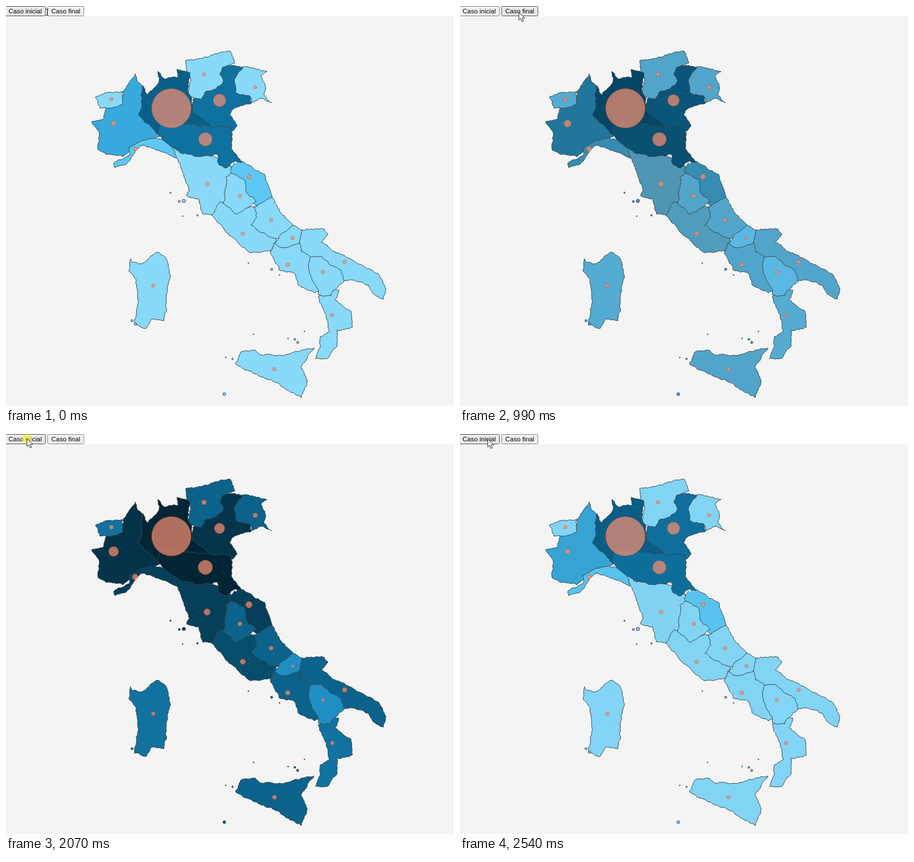
Write an HTML page that moves like this. It is 791 px wide and 708 px high and loops after 2610 ms.

```html
<!DOCTYPE html>
<html lang="es">
<head>
<meta charset="utf-8">
<title>Mapa</title>
<style>
html, body { margin: 0; width: 100%; height: 100%; overflow: hidden; background: #fff; }
svg { display: block; width: 791px; height: 708px; }
text { font: 11.5px "Liberation Sans", Arial, sans-serif; fill: #000; }
#land { stroke: #37474f; stroke-width: 1; stroke-linejoin: round; }
#dots { fill: #fa9172; fill-opacity: .7; stroke: #c9623f; stroke-opacity: .8; }
</style>
</head>
<body>
<svg viewBox="0 0 791 708">
  <rect y="18" width="791" height="690" fill="#f4f4f4"/>
  <g id="land"></g>
  <circle cx="405.5" cy="277" r="2" fill="#f4f4f4"/>
  <g id="dots"></g>
  <rect id="first" x="-2.5" y=".5" width="72" height="17" rx="2"/>
  <rect id="second" x="73.5" y=".5" width="64" height="17" rx="2"/>
  <text x="4.5" y="13">Caso inicial</text>
  <text x="80" y="13">Caso final</text>
  <circle id="click" r="9" fill="#f5ee3c" fill-opacity=".7"/>
  <path id="beam" d="M70,5.5h5M72.5,6v10M70,16.5h5" stroke="#333" fill="none"/>
  <path id="arrow" d="M0,0V14.2L3.2,11.2L5.6,16.6L8,15.6L5.7,10.3H10.2Z" fill="#fff" stroke="#111" stroke-width=".9"/>
</svg>
<script>
const LOOP = 2610, STEP = 76.8, LAST = 33, FADE = 6.7;
const $ = id => document.getElementById(id);
const lerp = (a, b, u) => a + (b - a) * u;
const span = (k, a, b) => Math.min(1, Math.max(0, (k - a) / (b - a)));
const ease = u => u < .5 ? 4 * u ** 3 : 1 - 4 * (1 - u) ** 3;
const rgb = hex => [1, 3, 5].map(i => parseInt(hex.slice(i, i + 2), 16));
const mix = (a, b, u) => `rgb(${a.map((v, i) => Math.round(lerp(v, b[i], u)))})`;
const parse = text => text.trim().split(/\s+/).map(p => p.split(",").map(Number));

function add(parent, tag, attrs) {
  const node = document.createElementNS("http://www.w3.org/2000/svg", tag);
  for (const key in attrs) node.setAttribute(key, attrs[key]);
  return $(parent).appendChild(node);
}

// Splits an edge into jagged pieces; the same edge always breaks the same way.
function roughen([ax, ay], [bx, by]) {
  const dx = bx - ax, dy = by - ay, len = Math.hypot(dx, dy);
  if (len < 4) return [[bx, by]];
  const noise = Math.sin((ax + bx) * 12.9 + (ay + by) * 78.2) * 43758.5;
  const side = (dx || dy) < 0 ? -1 : 1;
  const off = side * (noise - Math.floor(noise) - .5) * Math.min(.34, 2.8 / len);
  const mid = [(ax + bx) / 2 - dy * off, (ay + by) / 2 + dx * off];
  return [...roughen([ax, ay], mid), ...roughen(mid, [bx, by])];
}

function outline(pts) {
  const all = pts.flatMap((p, i) => roughen(p, pts[(i + 1) % pts.length]));
  return "M" + all.map(p => p.map(v => v.toFixed(1))).join("L") + "Z";
}

const LIGHT = "#88d9fa", SKY = "#5dc8f5", BLUE = "#0f719f";
const DEEP = "#0b628b", NAVY = "#053f5a", NIGHT = "#022535", MID = "#1172a0", PALE = "#1e8ec3";
const regions = [];

// Corners only; later regions cover the loose edges of earlier ones. Islets are x,y,radius.
function region([from, to], [cx, cy], [r0, r1], corners, islets) {
  const shapes = [add("land", "path", { d: outline(parse(corners)) })];
  if (islets) for (const [x, y, r = .9] of parse(islets)) {
    shapes.push(add("land", "circle", { cx: x, cy: y, r }));
  }
  regions.push({ from: rgb(from), to: rgb(to), r0, r1, shapes, dot: add("dots", "circle", { cx, cy }) });
}

// Piemonte
region(["#37a9dc", "#043349"], [190, 208], [4.3, 8.5],
  `228,120 231,131 243,142 248,165 246,200 272,230 255,241 222,250 206,267 177,263 163,255
   165,227 151,205 173,199 176,180 203,170 207,151 220,132`);
// Valle d'Aosta
region([LIGHT, MID], [186, 165], [2.8, 3.5], "158,161 181,153 206,151 206,174 183,181 166,181");
// Toscana
region([LIGHT, NAVY], [355, 315], [3.1, 5.5],
  `284,246 330,258 376,270 398,284 402,305 394,350 366,371 347,368 340,341 319,336 324,327
   314,300 301,269`,
  "290.5,330.5,1.3 306,346,1.8 314,345,3 312,372 338,370.5,1.4");
// Liguria
region([SKY, NAVY], [228, 253], [3.5, 5],
  `190,279 217,265 217,250 231,243 262,233 292,243 301,269 272,257 244,246 228,256 212,280 192,286`);
// Veneto
region([BLUE, "#04344a"], [377, 167], [11, 9],
  `376,126 380,112 390,105 418,108 412,125 412,148 431,160 434,171 399,184 395,193 408,213
   399,222 345,210 326,188 330,165 352,150`);
// Trentino-Alto Adige
region([LIGHT, DEEP], [349.5, 121], [2.8, 4],
  `317,97 345,93 377,83 396,80 404,101 382,109 378,122 384,133 370,147 351,153 345,165 328,162
   319,157 326,130 319,112`);
// Friuli
region([LIGHT, DEEP], [440, 144], [2.8, 4],
  "418,108 461,116 450,125 458,142 455,157 469,171 452,163 434,170 430,159 405,153 404,128");
// Lombardia
region(["#08608a", NIGHT], [292, 181], [34.6, 34.6],
  `240,142 251,157 270,135 268,116 280,129 304,126 302,112 325,118 321,150 328,162 329,187
   364,214 350,220 278,216 270,229 249,208 234,193 240,178`);
// Marche
region([SKY, NAVY], [429, 302], [3.5, 5.5],
  "396,290 406,276 418,275 440,291 457,298 470,339 450,354 428,345 418,312 398,300");
// Emilia-Romagna
region([BLUE, NIGHT], [352, 236], [11.8, 12.5],
  `269,228 290,248 307,260 341,267 373,262 376,281 388,287 403,275 417,277 400,255 397,213
   364,214 325,210 297,205 271,209`);
// Lazio
region([LIGHT, "#064d6c"], [418, 403], [3, 4.5],
  `363,370 378,346 395,352 415,358 450,352 448,380 478,408 468,433 432,437 410,419 389,401 371,379`,
  "428,455");
// Umbria
region([LIGHT, DEEP], [413, 336], [2.9, 3.5],
  "388,303 397,296 421,308 424,330 442,346 425,358 408,369 384,350 389,320");
// Abruzzo
region([LIGHT, DEEP], [468, 379], [2.9, 3.5],
  "438,357 469,339 486,367 507,388 500,408 474,411 446,398 432,388 443,374");
// Puglia
region([LIGHT, DEEP], [598, 453], [3, 4],
  `520,397 562,395 569,404 557,418 581,435 632,461 659,476 671,500 666,519 649,510 640,494
   613,485 597,487 570,462 530,448 514,421`);
// Campania
region([LIGHT, DEEP], [497.5, 458], [3.3, 4],
  "466,435 473,419 487,421 518,418 522,435 537,444 548,465 556,502 545,508 516,494 509,473 482,467",
  "469,466,2 483,476");
// Molise
region([LIGHT, PALE], [506, 411], [2.9, 2.5], "507,388 523,397 518,420 488,428 475,421 488,402");
// Calabria
region([LIGHT, MID], [576, 547], [2.9, 3.2],
  `562,506 580,500 588,503 581,520 609,540 612,568 584,574 585,600 568,624 546,624 555,602
   555,585 571,576 565,551 551,515`);
// Basilicata
region([LIGHT, PALE], [559.5, 471], [2.9, 2.7],
  "537,445 558,444 572,458 591,467 597,487 577,504 574,513 552,512 550,499 538,478 534,459");
// Sicilia
region([LIGHT, DEEP], [474, 643], [3, 3.6],
  "544,605 521,640 531,667 522,693 490,675 455,657 405,633 414,613 440,609 450,618 493,617",
  "385.5,687,2.6 388,622 400,624.5,1.4 437,581 498,588.5 510,590,1.7 515,595.5,2 527,576");
// Sardegna
region([LIGHT, MID], [260, 495], [2.8, 3.2],
  `220,447 224,454 240,456 266,436 283,448 291,479 286,495 279,557 258,554 247,571 227,562
   233,520 230,485 217,469`,
  "222.5,557,2 228.5,563,2.2");

function button(id, hover) {
  $(id).setAttribute("fill", hover ? "#e9e9e9" : "#efefef");
  $(id).setAttribute("stroke", hover ? "#4f4f4f" : "#858585");
}

const show = (id, on) => $(id).setAttribute("visibility", on ? "visible" : "hidden");

function draw(ms) {
  const k = Math.min(LAST, Math.floor((ms + 18) / STEP));
  const fade = start => ease(span(k, start, start + FADE));
  const u = fade(9.8) - fade(27.8);
  for (const { from, to, r0, r1, shapes, dot } of regions) {
    const fill = mix(from, to, u);
    shapes.forEach(s => s.setAttribute("fill", fill));
    dot.setAttribute("r", lerp(r0, r1, u));
  }
  const right = span(k, 0, 4), left = span(k, 17, 25), leave = span(k, 32, 33);
  const x = 72 + 32 * right - 67 * left + 12 * leave;
  const y = 5 + 6 * right - 3 * left + leave;
  button("first", k === 0 || x < 70);
  button("second", k > 0 && x >= 73);
  show("beam", k === 0);
  show("arrow", k > 0);
  $("arrow").setAttribute("transform", `translate(${x} ${y})`);
  show("click", [9, 27].some(start => k >= start && k < start + 2));
  $("click").setAttribute("cx", x);
  $("click").setAttribute("cy", y + 1);
}

const began = performance.now();
function tick() {
  draw((performance.now() - began) % LOOP);
  requestAnimationFrame(tick);
}
tick();
</script>
</body>
</html>
```
